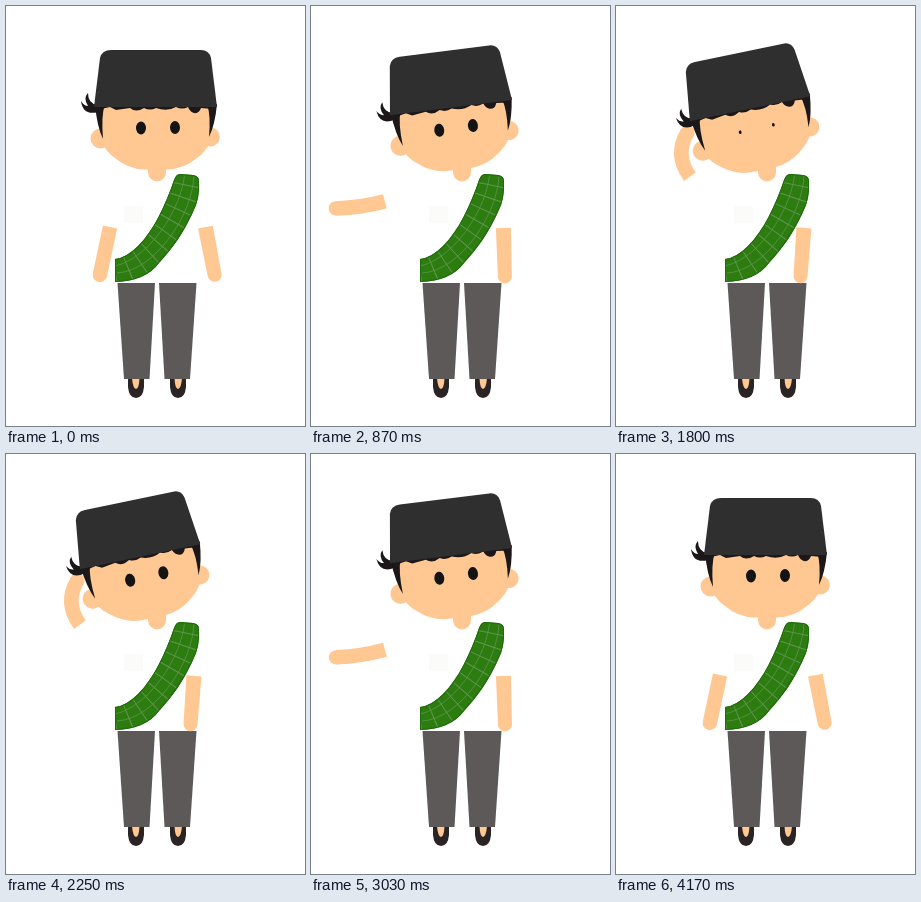
An HTML page that plays this animation: 299 by 420 pixels, repeating every 4500 ms.

```html
<!DOCTYPE html>
<html lang="en">
<head>
<meta charset="utf-8">
<title>Greeting</title>
<style>
  html, body { margin: 0; width: 100%; height: 100%; overflow: hidden; background: #fff; }
  svg { display: block; width: 100vw; height: 100vh; }
  .skin { fill: #ffc893; }
  .hair { fill: #1c1718; }
  .shoe { fill: #2b2425; }
  .eye { fill: #141414; }
</style>
</head>
<body>
<svg viewBox="0 0 299 420">
  <defs>
    <path id="sash" d="M174 168L187 169Q193 170 193 175Q194 193 187 206C178 226 167 242 153 257Q140 275 109 276L109 253Q120 252 132 240C148 224 159 200 168 174Q170 168 174 168Z"/>
    <path id="thread" d="M183 166C182 205 144 262 106 264"/>
    <clipPath id="sashClip"><use href="#sash"/></clipPath>
  </defs>

  <!-- legs and shoes -->
  <g id="leg">
    <path class="shoe" d="M122 372H138V381Q137 392 130 392Q123 392 122 381Z"/>
    <path class="skin" d="M126 372H133.500Q133 383 130 383Q127 383 126 372Z"/>
    <path fill="#5d5959" d="M111.500 277H149L143.500 373H118Z"/>
  </g>
  <use href="#leg" transform="matrix(-1 0 0 1 302 0)"/>

  <!-- shirt pocket and sash -->
  <rect x="118" y="200" width="19" height="17" fill="#fbfbf9"/>
  <use href="#sash" fill="#2d7c10"/>
  <g clip-path="url(#sashClip)" fill="none" stroke="#5f9550" stroke-width=".8">
    <use href="#thread" stroke-width="34" stroke-dasharray="1 12"/>
    <use href="#thread" x="-4" y="-3"/>
    <use href="#thread" x="5" y="3"/>
    <use href="#sash" stroke="#1f6a0a" stroke-width="2"/>
  </g>

  <!-- arms -->
  <path id="rightArm" class="skin" d="M183.500 222H198.500L198 270.500A7 7 0 0 1 184 270.500Z"/>
  <path id="leftArm" fill="none" stroke="#ffc893" stroke-width="14.5"/>
  <circle id="hand" class="skin" r="7.2"/>

  <path class="skin" d="M142 150H160V166.500A9 9 0 0 1 142 166.500Z"/>
  <g id="head">
    <circle class="skin" cx="94.500" cy="132.500" r="10"/>
    <circle class="skin" cx="204.300" cy="131" r="9.500"/>
    <path class="skin" d="M93 98H207V120C207 134 202 144 191 152Q178 163 161 163.500H138Q122 163 109 152C98 144 93 134 93 120Z"/>
    <path class="hair" d="M89 98H99Q95 110 97 133Q91 121 89 98ZM211 98H201Q205 110 203 131Q209 119 211 98Z"/>
    <path class="hair" d="M92 106Q77 110 75 95Q78 100 82 100Q77 92 82 87Q82 97 91 99Z"/>
    <path class="hair" d="M95 99H207V103L195 102Q193 108 188 107Q184 106 182 101Q176 104 170 101Q161 106 150 102Q144 105 138 102Q130 107 124 102L110 104L104 101L95 103Z"/>
    <path fill="#2f2f2f" d="M105 44H195Q203 44 205 52L211 101H88L94 52Q96 44 105 44Z"/>
    <ellipse class="eye" cx="135" cy="122" rx="5" ry="6.500"/>
    <ellipse class="eye" cx="169" cy="121.500" rx="5" ry="6.500"/>
  </g>
</svg>
<script>
const LOOP = 4500;
const byId = id => document.getElementById(id);
const eyes = document.querySelectorAll('.eye');

// smooth 0..1 ramp between two times
const ease = (t, from, to) => {
  const x = Math.min(1, Math.max(0, (t - from) / (to - from)));
  return x * x * (3 - 2 * x);
};

// angles are measured from straight down, turning towards the left
const step = ([x, y], angle, length) => {
  const a = angle * Math.PI / 180;
  return [x - Math.sin(a) * length, y + Math.cos(a) * length];
};

const blink = (t, middle) => ease(t, middle - 225, middle) - ease(t, middle, middle + 225);

function draw(t) {
  const lift = ease(t, 450, 1180) - ease(t, 2720, 3450);
  const bend = ease(t, 750, 1180) - ease(t, 2720, 3150);

  byId('head').setAttribute('transform', `rotate(${-11.7 * lift} 150 177)`);
  byId('rightArm').setAttribute('transform', `rotate(${-11 + 15 * lift} 191 178)`);

  const swing = 12 + 90 * lift;
  const sleeve = step([113, 179], swing, 43 - 3 * bend);
  const elbow = step(sleeve, swing + 42 * bend, 24.5 + 2.5 * bend);
  const hand = step(elbow, swing + 109 * bend, 24.5 + 1.5 * bend);
  byId('leftArm').setAttribute('d', `M${sleeve}Q${elbow} ${hand}`);
  byId('hand').setAttribute('transform', `translate(${hand})`);

  const open = 1 - 0.72 * (blink(t, 1800) + blink(t, 3945));
  for (const eye of eyes) {
    eye.setAttribute('rx', 5 * open);
    eye.setAttribute('ry', 6.5 * open);
  }
}

function frame() {
  draw(performance.now() % LOOP);
  requestAnimationFrame(frame);
}
frame();
</script>
</body>
</html>
```
